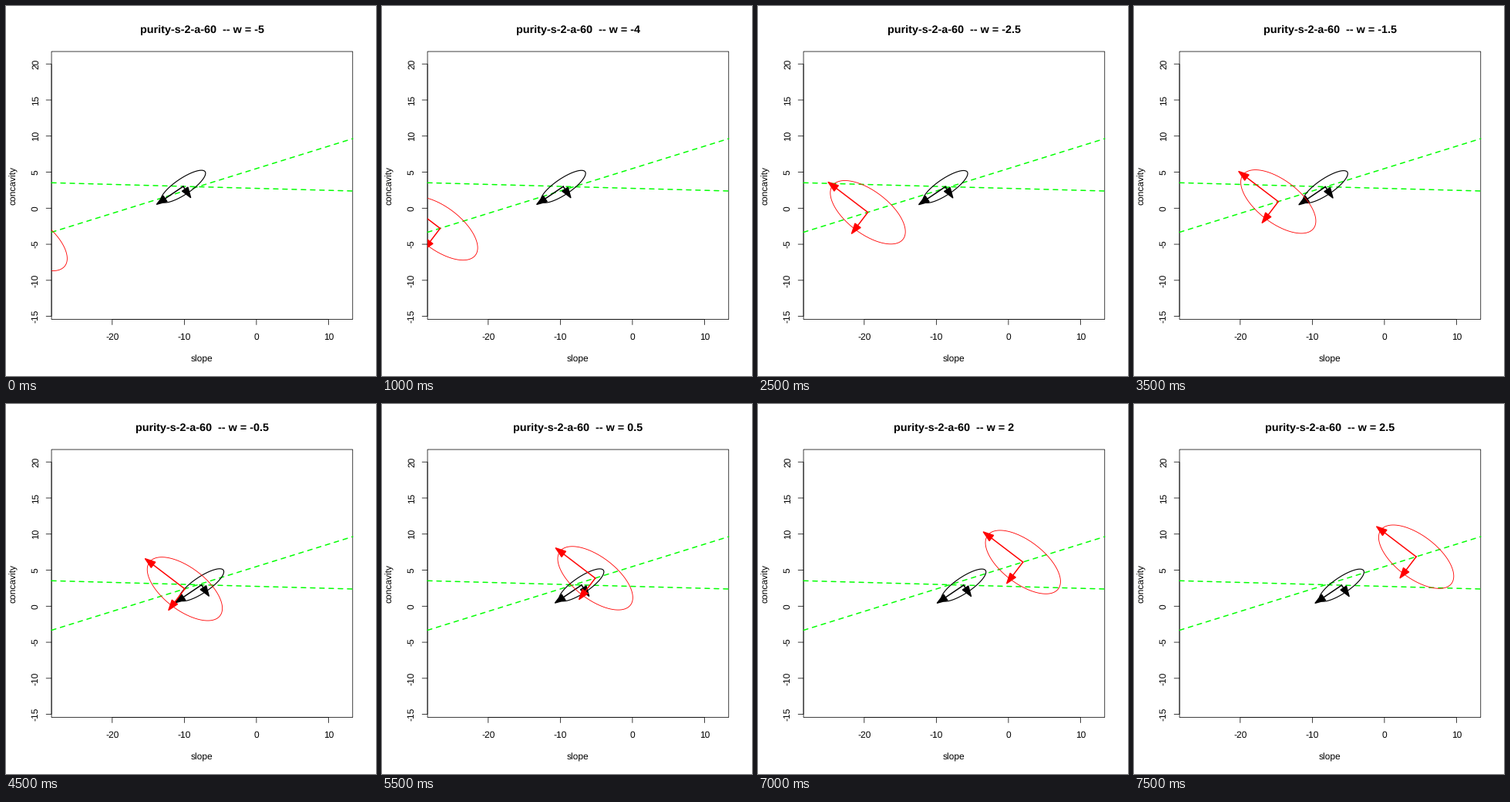
Animation of 480 by 480 pixels, one loop 8 s. Source, as a matplotlib script:

```python
import matplotlib.pyplot as plt
import numpy as np
from matplotlib.animation import FuncAnimation
from matplotlib.patches import Polygon, Rectangle

plt.rcParams["font.family"] = "Liberation Sans"
plt.rcParams["text.hinting"] = "none"

SIZE, FRAMES, STEP_MS = 480, 16, 500
LEFT, RIGHT, TOP, BOTTOM = 59.04, 449.76, 59.04, 406.56
UNIT = 9.355                     # pixels per data unit on both axes
X0, Y0 = 324.9, 262.3            # pixel position of the data origin
MID_X, MID_Y = (LEFT + RIGHT) / 2, (TOP + BOTTOM) / 2
THIN, THICK = 0.75, 1.5

# At 72 dpi one point is one pixel.
fig = plt.figure(figsize=(SIZE / 72, SIZE / 72), dpi=72, facecolor="white")
ax = fig.add_axes([0, 0, 1, 1])
ax.set_xlim(0, SIZE)
ax.set_ylim(SIZE, 0)
ax.axis("off")


def label(x, y, text, size=12, **kw):
    return ax.text(x, y, text, fontsize=size, ha="center", va="baseline",
                   rotation_mode="anchor", **kw)


def rule(xs, ys):
    ax.plot(xs, ys, color="black", lw=THIN, snap=False, zorder=1,
            solid_capstyle="butt")


def draw_axes():
    ax.add_patch(Rectangle((LEFT, TOP), RIGHT - LEFT, BOTTOM - TOP, fill=False,
                           ec="black", lw=THIN, snap=False, zorder=1))
    xs = [(v, X0 + v * UNIT) for v in range(-20, 11, 10)]
    ys = [(v, Y0 - v * UNIT) for v in range(-15, 21, 5)]
    rule([xs[0][1], xs[-1][1]], [BOTTOM, BOTTOM])
    rule([LEFT, LEFT], [ys[0][1], ys[-1][1]])
    for v, x in xs:
        rule([x, x], [BOTTOM, BOTTOM + 7.2])
        label(x, 432.7, str(v))
    for v, y in ys:
        rule([LEFT, LEFT - 7.2], [y, y])
        label(41.8, y, str(v), rotation=90)
    label(MID_X, 461.5, "slope")
    label(13.1, MID_Y, "concavity", rotation=90)


class Cloud:
    """Ellipse with an arrow along each principal axis, moving linearly in w."""

    turn = np.linspace(0, 2 * np.pi, 181)

    def __init__(self, color, start, speed, angle, radii, lw, z):
        self.start, self.speed = np.array(start), np.array(speed)
        self.radii = radii
        rad = np.radians([angle, angle - 90])
        self.dirs = np.column_stack([np.cos(rad), np.sin(rad)])
        self.ring, = ax.plot([], [], color=color, lw=lw, zorder=z)
        self.shafts = [ax.plot([], [], color=color, lw=THICK, zorder=z)[0]
                       for _ in radii]
        self.heads = [ax.add_patch(Polygon(np.zeros((3, 2)), fc=color, ec=color,
                                           lw=THICK, joinstyle="round", zorder=z))
                      for _ in radii]
        for part in [self.ring, *self.shafts, *self.heads]:
            part.set_clip_path(frame)

    @staticmethod
    def head(tip, along, length=13, half=4.4):
        across = np.array([-along[1], along[0]])
        base = tip - length * along
        return np.array([tip, base + half * across, base - half * across])

    def move(self, w):
        c = self.start + self.speed * w
        (a, b), (u, v) = self.radii, self.dirs
        pts = c + np.outer(a * np.cos(self.turn), u) + np.outer(b * np.sin(self.turn), v)
        self.ring.set_data(pts[:, 0], pts[:, 1])
        for shaft, head, r, d in zip(self.shafts, self.heads, self.radii, self.dirs):
            end = c + r * d
            shaft.set_data([c[0], end[0]], [c[1], end[1]])
            head.set_xy(self.head(end + 7 * d, d))


draw_axes()
frame = Rectangle((LEFT, TOP), RIGHT - LEFT, BOTTOM - TOP, transform=ax.transData)
for y_left, y_right in ((293.5, 172.1), (229.3, 240)):
    ax.plot([LEFT, RIGHT], [y_left, y_right], color="#00ff00", lw=THICK, zorder=2,
            dashes=(4, 4), dash_capstyle="round", clip_path=frame)

title = label(MID_X, 35, "", 14.4, weight="bold")
clouds = [
    Cloud("black", (256.2, 234.8), (5.27, 0.14), 146, (34.3, 10.3), 1.15, 3),
    Cloud("red", (254.3, 232.9), (44.72, -13.9), 217.3, (57.5, 27.6), 0.85, 4),
]


def update(i):
    w = -5 + 0.5 * i
    title.set_text(f"purity-s-2-a-60  -- w = {w:g}")
    for cloud in clouds:
        cloud.move(w)
    return []


anim = FuncAnimation(fig, update, frames=FRAMES, interval=STEP_MS,
                     repeat=True, repeat_delay=0, blit=False)
plt.show()
```
